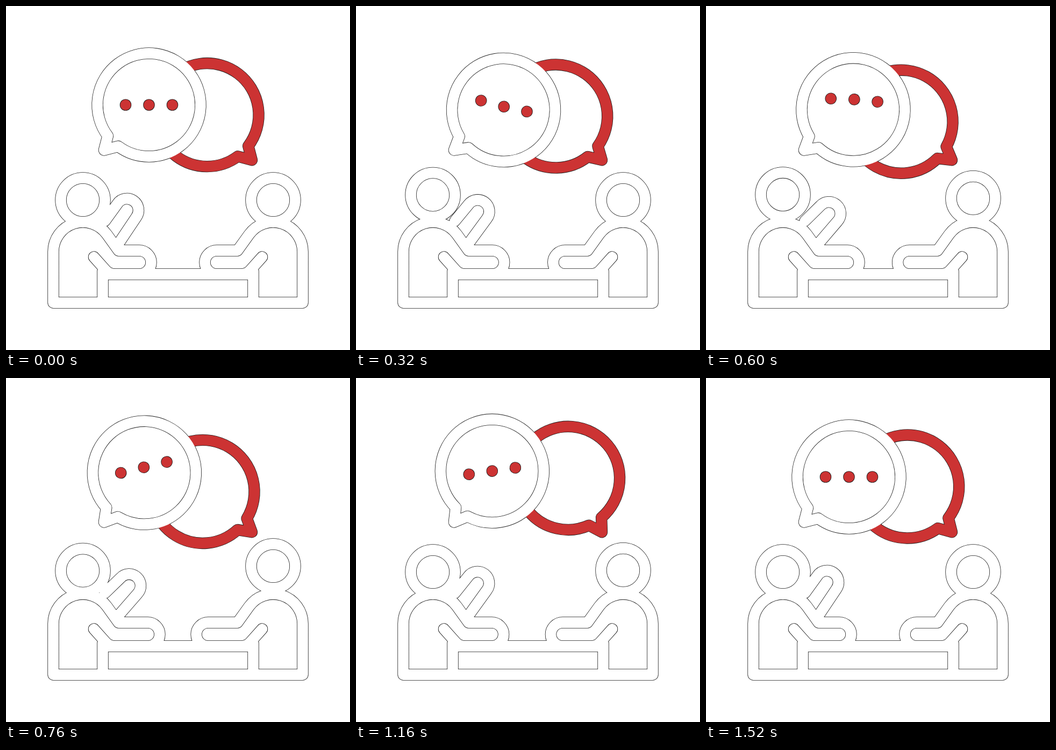
Recreate the animation shown at these times as an HTML page with a canvas. Size 640x640 px, loop 1.56 s.

```html
<!DOCTYPE html>
<html lang="en">
<head>
<meta charset="utf-8">
<title>Conversation</title>
<style>
html, body { margin: 0; width: 100%; height: 100%; overflow: hidden; background: #fff; }
canvas { display: block; width: 640px; height: 640px; }
</style>
</head>
<body>
<canvas id="stage" width="640" height="640"></canvas>
<script>
const ctx = document.getElementById('stage').getContext('2d');
const LOOP = 1560, STEP = 40;
const RED = '#cc3333', EDGE = '#1c1c1c', WHITE = '#fff';
const OUTER = 21.4, INNER = 19.8;
const RAD = Math.PI / 180;
const MIRROR = new DOMMatrix([-1, 0, 0, 1, 640, 0]);

const ease = u => u < 0.5 ? 2 * u * u : 1 - 2 * (1 - u) ** 2;

// Eased rise and fall, 1 at the peak and 0 beyond half.
const pulse = (t, peak, half) => 1 - ease(Math.min(1, Math.abs(t - peak) / half));

// Bubble tilt in degrees: dips forward, swings back, settles.
function sway(t) {
  const keys = [0, 8.2, -13, 0];
  const pos = Math.max(0, Math.min(2.9999, (t - 16) / 470));
  const i = Math.floor(pos);
  return keys[i] + (keys[i + 1] - keys[i]) * ease(pos - i);
}

// Speech bubble with the tip of its tail at the origin.
const CX = 83.5, CY = -84;
const bubble = new Path2D();
bubble.arc(CX, CY, 96, 143 * RAD, 486.6 * RAD);
bubble.lineTo(0, 0);
bubble.closePath();

const table = new Path2D('M180 499H460V552H180ZM88 552H552');

function person(headY, reach) {
  const x = 248 + reach;
  const p = new Path2D(
    `M88 552V457A55 55 0 0 1 187.8 425.1L209.4 455` +
    `H${x}A22 22 0 0 1 ${x} 499H203Q192 499 185 491L163.5 467M180 493V552`);
  p.moveTo(184, headY);
  p.arc(143, headY, 41, 0, 2 * Math.PI);
  return p;
}

function raisedArm(k) {
  const x = 225 + 4 * k, y = 380 + 6.5 * k;
  const a = Math.atan2(y - 421.5, x - 196);
  const p = new Path2D();
  p.moveTo(184, 400);
  p.arc(x, y, 21.5, a - Math.PI / 2, a + Math.PI / 2);
  p.lineTo(210, 441);
  return p;
}

function stroke(path, color, width) {
  ctx.strokeStyle = color;
  ctx.lineWidth = width;
  ctx.stroke(path);
}

function atBubble(x, y, flip, deg, paint) {
  ctx.save();
  ctx.translate(x, y);
  ctx.scale(flip, 1);
  ctx.rotate(deg * RAD);
  paint();
  ctx.restore();
}

function disc(x, y, r, color) {
  ctx.fillStyle = color;
  ctx.beginPath();
  ctx.arc(x, y, r, 0, 2 * Math.PI);
  ctx.fill();
}

function drawBubbles(t) {
  const front = paint => atBubble(182.5, 268, 1, sway(t), paint);
  const backTilt = sway((t - 160 + LOOP) % LOOP);

  front(() => stroke(bubble, EDGE, OUTER));
  atBubble(457.5, 286.7, -1, backTilt, () => {
    stroke(bubble, EDGE, OUTER);
    stroke(bubble, RED, INNER);
  });
  front(() => {
    ctx.fillStyle = WHITE;
    ctx.fill(bubble);
    ctx.save();
    ctx.clip(bubble);
    stroke(bubble, EDGE, OUTER);
    ctx.restore();
    stroke(bubble, WHITE, INNER);
    for (let i = 0; i < 3; i++) {
      const x = CX + (i - 1) * 43.5;
      const y = CY - 19.3 * pulse(t, 485 + 77 * i, 405);
      disc(x, y, 10.8, EDGE);
      disc(x, y, 10, RED);
    }
  });
}

function drawPeople(t) {
  const leftMove = pulse(t, 725, 700);
  const scene = new Path2D(table);
  scene.addPath(person(361 - 12.5 * pulse(t, 466, 430), 16 * leftMove));
  scene.addPath(raisedArm(leftMove));
  scene.addPath(person(361 - 13 * pulse(t, 880, 433), 16 * pulse(t, 800, 700)), MIRROR);
  stroke(scene, EDGE, OUTER);
  stroke(scene, WHITE, INNER);
}

function frame(now) {
  const t = Math.floor(now % LOOP / STEP) * STEP;
  ctx.fillStyle = WHITE;
  ctx.fillRect(0, 0, 640, 640);
  ctx.lineCap = ctx.lineJoin = 'round';
  drawBubbles(t);
  drawPeople(t);
}

const start = performance.now();
function tick() {
  frame(performance.now() - start);
  requestAnimationFrame(tick);
}
tick();
</script>
</body>
</html>
```
